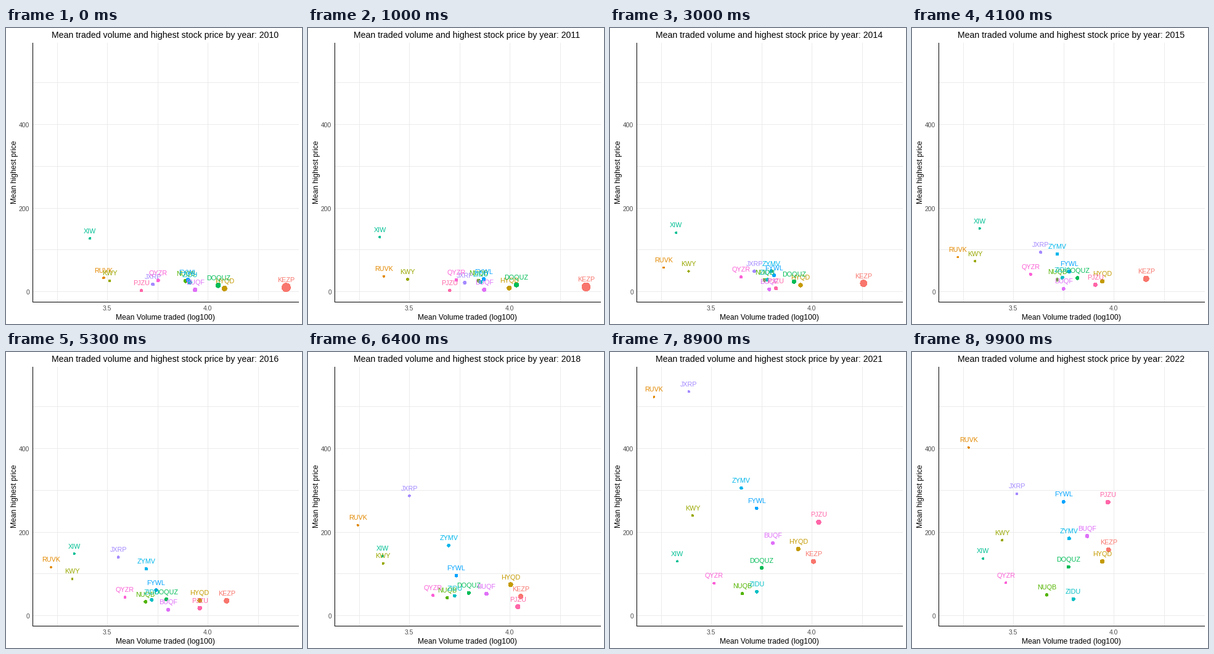
A matplotlib script for the animation above (10 s loop, 480x480 px).

```python
import matplotlib.pyplot as plt
import numpy as np
from matplotlib.animation import FuncAnimation

SIDE, DPI = 480, 80
PT = 72 / DPI  # points per pixel
FRAMES, INTERVAL = 100, 100
LEFT, RIGHT, TOP, BOTTOM = 43, 474, 24, 444

YEARS = np.arange(2010, 2023)
VOL_YEARS = np.array([2010, 2012, 2015, 2018, 2020, 2022])
PRICE_YEARS = np.array([2010, 2015, 2018, 2021, 2022])
VOL_MIN, VOL_MAX = 3.189, 4.390

# animation step on which each year's values are reached
STEPS = np.arange(FRAMES)
KNOTS = np.rint(np.linspace(0, FRAMES - 1, len(YEARS)))

plt.rcParams["font.family"] = "Liberation Sans"


def px(vol):
    return 164.2 + (vol - 3.5) * 326


def py(price):
    return 427.1 - price * 0.6775


def hue_color(deg, chroma=100, light=65):
    """Polar CIE-LUV colour as RGB."""
    hue = np.radians(deg)
    u = chroma * np.cos(hue) / (13 * light) + 0.1978
    v = chroma * np.sin(hue) / (13 * light) + 0.4683
    y = ((light + 16) / 116) ** 3
    xyz = y * np.array([9 * u, 4 * v, 12 - 3 * u - 20 * v]) / (4 * v)
    rgb = np.clip(np.array([[3.2406, -1.5372, -0.4986],
                            [-0.9689, 1.8758, 0.0415],
                            [0.0557, -0.2040, 1.0570]]) @ xyz, 0, 1)
    return np.where(rgb > 0.0031308, 1.055 * rgb ** (1 / 2.4) - 0.055, 12.92 * rgb)


def yearly_vol(keys):
    """Straight lines between key years, with a quiet market in late odd years."""
    quiet = (YEARS > 2016) & (YEARS % 2 == 1)
    return np.interp(YEARS, VOL_YEARS, keys) - 0.055 * quiet


def yearly_price(keys):
    """Compound growth between key years, gathering pace towards each key."""
    keys = np.array(keys, float)
    j = np.searchsorted(PRICE_YEARS[1:-1], YEARS, side="right")
    u = (YEARS - PRICE_YEARS[j]) / (PRICE_YEARS[j + 1] - PRICE_YEARS[j])
    return keys[j] * (keys[j + 1] / keys[j]) ** u ** 1.6


def diameter(vol):
    """Pixel diameter of a dot whose area follows the traded volume."""
    low, high = 100 ** VOL_MIN, 100 ** VOL_MAX
    share = np.clip((100 ** vol - low) / (high - low), 0, 1)
    return 2.3 * (1 + 5 * np.sqrt(share))


def tween(values):
    return np.interp(STEPS, KNOTS, values)


names, tracks = [], []


def stock(name, vols, prices, start=2010):
    vol = np.where(YEARS < start, np.nan, yearly_vol(vols))
    names.append(name)
    tracks.append([tween(px(vol)), tween(py(yearly_price(prices))),
                   tween(diameter(vol))])


stock("KEZP", (4.39, 4.373, 4.161, 4.06, 4.10, 3.974), (9.4, 30.3, 47.7, 142, 157))
stock("RUVK", (3.482, 3.31, 3.224, 3.261, 3.245, 3.278), (32.5, 82, 240, 565, 402))
stock("HYQD", (4.083, 3.946, 3.943, 4.025, 3.996, 3.943), (7, 24.1, 83, 170, 129))
stock("KWY", (3.512, 3.479, 3.31, 3.39, 3.453, 3.445), (25.4, 72.3, 133, 254, 180))
stock("NUQB", (3.89, 3.819, 3.719, 3.701, 3.717, 3.667), (25, 28.4, 44, 53, 49))
stock("DOQUZ", (4.052, 4.021, 3.819, 3.809, 3.805, 3.775), (14.4, 32, 57, 122, 116))
stock("XIW", (3.414, 3.317, 3.333, 3.385, 3.39, 3.35), (127, 150.5, 141, 128, 136))
stock("ZIDU", (3.911, 3.822, 3.744, 3.739, 3.75, 3.799), (21.5, 33, 49, 57.5, 39))
stock("ZYMV", (3.9, 3.893, 3.719, 3.709, 3.638, 3.778), (18, 89.5, 180, 322, 184), start=2012)
stock("FYWL", (3.902, 3.852, 3.779, 3.745, 3.78, 3.75), (27.5, 47.5, 103, 280, 272))
stock("JXRP", (3.727, 3.806, 3.637, 3.503, 3.375, 3.518), (16.9, 93.5, 322, 565, 291))
stock("BUQF", (3.937, 3.834, 3.75, 3.911, 3.837, 3.868), (3.7, 6.2, 62, 191, 190))
stock("QYZR", (3.753, 3.722, 3.586, 3.636, 3.616, 3.463), (26.2, 41, 48.5, 81, 78))
stock("PJZU", (3.67, 3.72, 3.908, 4.067, 4.145, 3.971), (1.9, 15.9, 21.5, 264, 271))

xs, ys, sizes = np.array(tracks).transpose(1, 0, 2)
colors = [hue_color(15 + 360 * k / len(names)) for k in range(len(names))]

fig = plt.figure(figsize=(SIDE / DPI, SIDE / DPI), dpi=DPI, facecolor="white")
ax = fig.add_axes([0, 0, 1, 1])
ax.set(xlim=(0, SIDE), ylim=(SIDE, 0))
ax.axis("off")


def rule(x, y, color, z):
    ax.plot(x, y, color=color, lw=PT, antialiased=False,
            solid_capstyle="butt", zorder=z)


def write(x, y, text, size, color="black", **kw):
    kw = {"ha": "center", "va": "baseline", **kw}
    return ax.text(x, y, text, fontsize=size * PT, color=color, zorder=4, **kw)


for vol in np.arange(3.25, 4.3, 0.25):
    rule([round(px(vol))] * 2, [TOP, BOTTOM], "#EBEBEB", 1)
for price in range(0, 501, 100):
    rule([LEFT, RIGHT], [round(py(price))] * 2, "#EBEBEB", 1)
rule([LEFT] * 2, [TOP, BOTTOM], "black", 5)
rule([LEFT, RIGHT], [BOTTOM] * 2, "black", 5)

for vol in (3.5, 4.0):
    write(px(vol), 458, f"{vol:.1f}", 10.4, "#4D4D4D")
for price in (0, 200, 400):
    write(38, round(py(price)) + 5, str(price), 10.4, "#4D4D4D", ha="right")

title = write(258, 16, "", 14.2)
write(258, 473, "Mean Volume traded (log100)", 12.15)
write(17, 234, "Mean highest price", 12.15, rotation=90, rotation_mode="anchor")

dots = ax.scatter(xs[:, 0], ys[:, 0], c=colors, linewidths=0,
                  antialiased=False, snap=False, zorder=3)
labels = [write(0, 0, n, 10.8, c) for n, c in zip(names, colors)]


def draw(i):
    year = round(np.interp(i, [0, FRAMES - 1], YEARS[[0, -1]]))
    title.set_text(f"Mean traded volume and highest stock price by year: {year}")
    shown = np.isfinite(xs[:, i])
    x = np.where(shown, xs[:, i], -50)
    y = ys[:, i]
    dots.set_offsets(np.column_stack([x, y]))
    dots.set_sizes((np.where(shown, sizes[:, i], 0) * PT) ** 2)
    for label, on, lx, ly in zip(labels, shown, x, y):
        label.set_visible(bool(on))
        label.set_position((lx, ly - 8.5))
    return [title, dots, *labels]


anim = FuncAnimation(fig, draw, frames=FRAMES, interval=INTERVAL, repeat=True)
plt.show()
```
